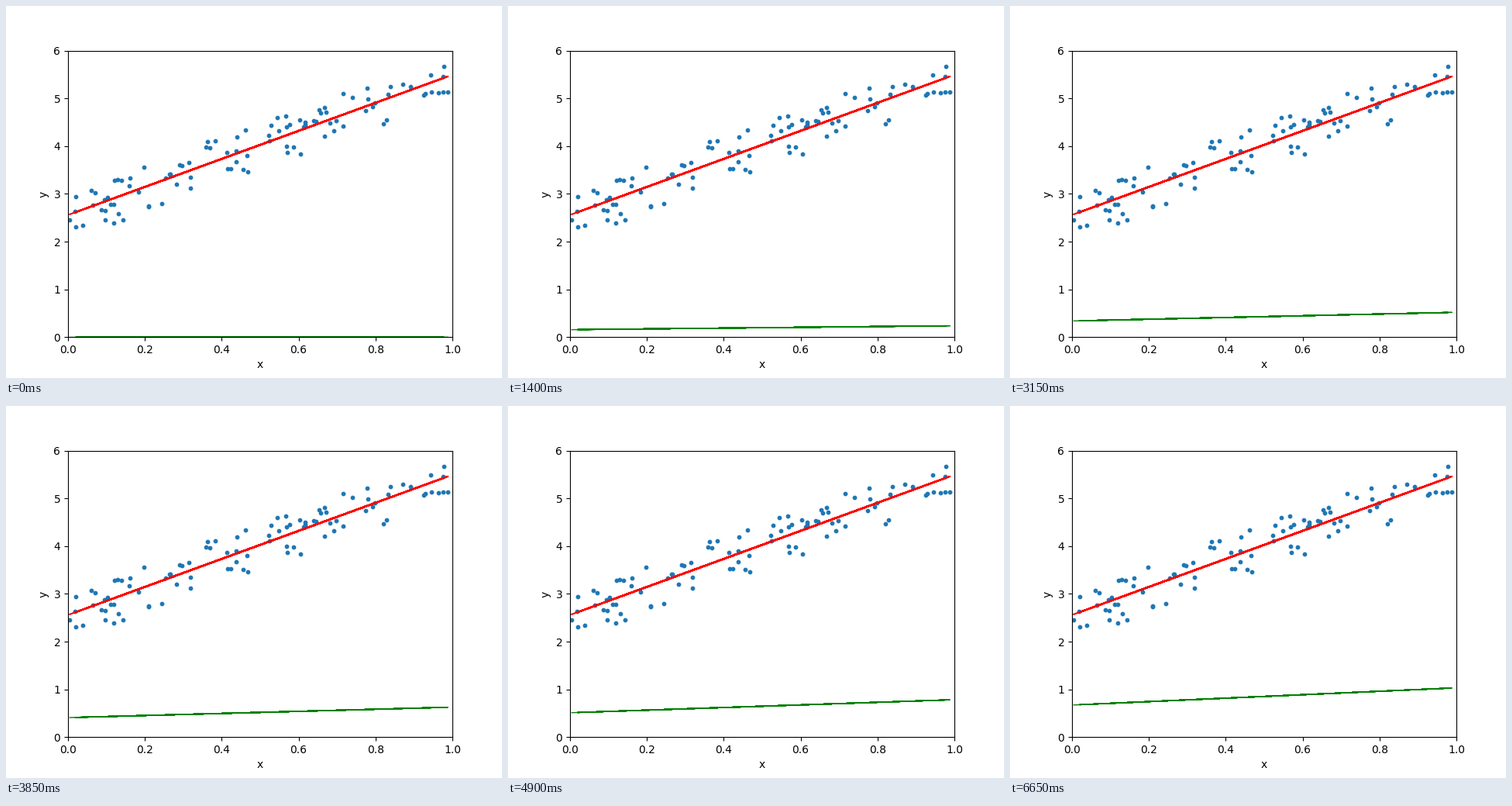
A matplotlib script that plays this animation: 640 px wide and 480 px high, repeating every 7000 ms.

```python
import matplotlib.pyplot as plt
import numpy as np
from matplotlib.animation import FuncAnimation

FRAMES = 20
INTERVAL = 350
RATE = 0.01

np.random.seed(0)
x = np.random.rand(100)
y = 2 + 3 * x + np.random.rand(100)


def descend(steps):
    """Intercept and slope after some steps of gradient descent from zero."""
    intercept = slope = 0.0
    for _ in range(steps):
        error = intercept + slope * x - y
        intercept -= RATE * error.mean()
        slope -= RATE * (error * x).mean()
    return intercept, slope


fig, ax = plt.subplots(figsize=(6.4, 4.8), dpi=100)
ax.set(xlim=(0, 1), ylim=(0, 6), xlabel="x", ylabel="y")
ax.scatter(x, y, s=10)

# Points stay unsorted, so the overlapping strokes thicken the lines.
best_slope, best_intercept = np.polyfit(x, y, 1)
ax.plot(x, best_intercept + best_slope * x, color="r")
fit, = ax.plot(x, 0 * x, color="g", linewidth=1)


def draw(step):
    intercept, slope = descend(step)
    fit.set_ydata(intercept + slope * x)
    return fit,


anim = FuncAnimation(fig, draw, frames=FRAMES, interval=INTERVAL,
                     init_func=lambda: draw(0), repeat=True, repeat_delay=0)
plt.show()
```
